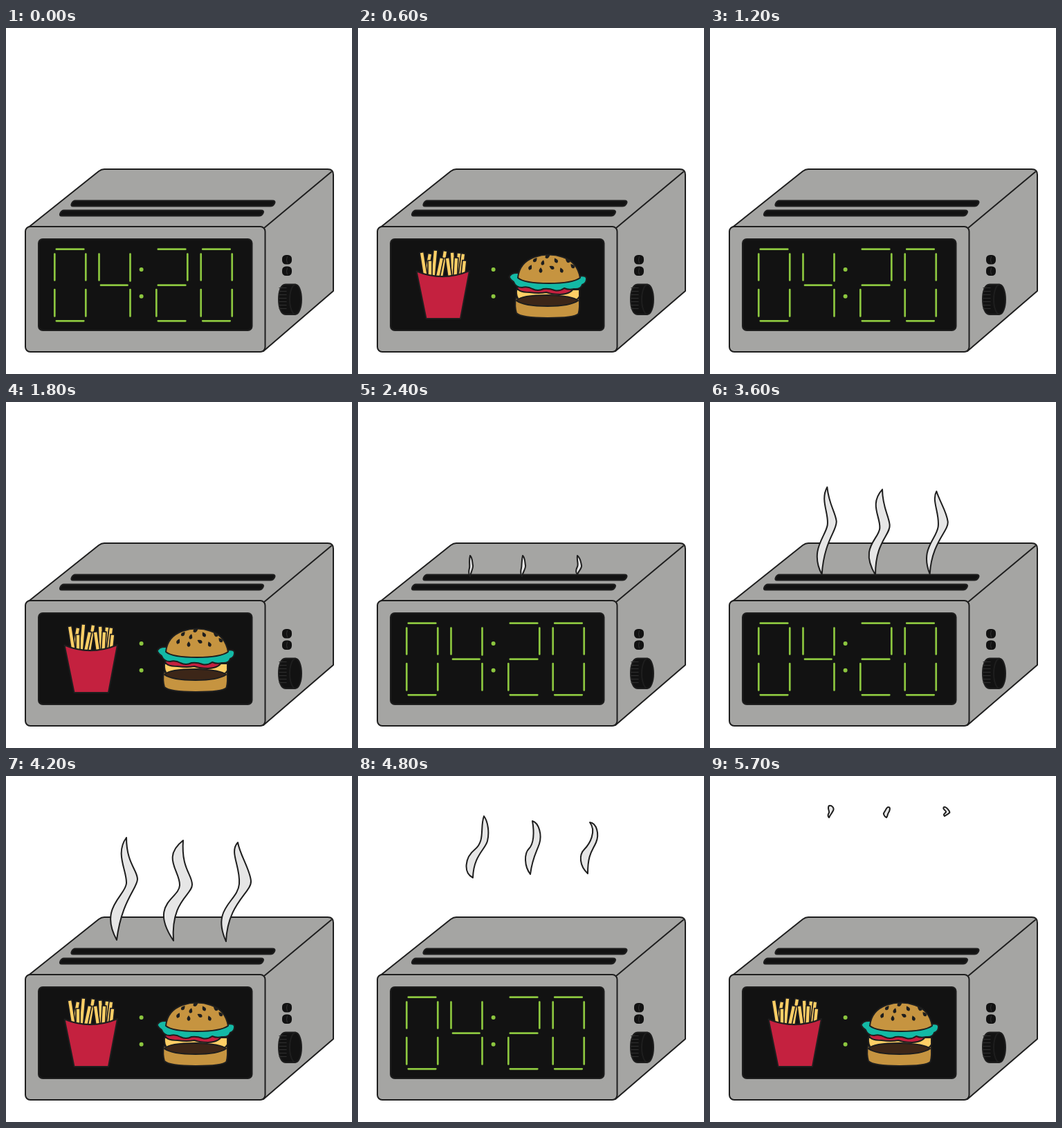
Recreate the animation shown at these times as an HTML page without scripts. Size 500x500 px, loop 6000 ms.

```html
<!DOCTYPE html>
<html lang="en">
<head>
<meta charset="utf-8">
<title>Snack alarm</title>
<style>
  html, body { margin: 0; width: 100%; height: 100%; overflow: hidden; background: #fff; }
  svg { display: block; width: 100%; height: 100%; }

  .ink { stroke: #1e1e1e; stroke-width: 2; stroke-linejoin: round; stroke-linecap: round; }
  .body { fill: #a5a5a3; }
  .dark { fill: #121212; }
  .led { fill: none; stroke: #8cc63f; stroke-width: 2.7; stroke-linecap: round; }
  .red { fill: #c4213f; }
  .bun { fill: #c69440; }
  .yellow { fill: #ffcf66; }

  /* display swaps every 600 ms */
  .clock, .food { animation: blink 1.2s step-end infinite; }
  .food { opacity: 0; animation-name: blink-alt; }
  @keyframes blink { 0% { opacity: 1 } 50%, 100% { opacity: 0 } }
  @keyframes blink-alt { 0% { opacity: 0 } 50%, 100% { opacity: 1 } }

  /* steam rises in 300 ms steps */
  .steam { fill: #e6e6e6; animation: appear 6s step-end infinite; }
  .steam path { animation: 6s infinite; }
  .w1 { animation-name: rise1 !important; }
  .w2 { animation-name: rise2 !important; }
  .w3 { animation-name: rise3 !important; }
  @keyframes appear { 0% { opacity: 0 } 40%, 100% { opacity: 1 } }

  @keyframes rise1 {
    0%, 40% { d: path("M162 222 C166 226 165 232 166 236 S163 246 162 252 C159 248 160 244 161 240 S160 230 162 222Z"); animation-timing-function: steps(2) }
    50% { d: path("M162 185 C169 187 167 200 172 212 S164 232 163 252 C158 246 159 228 165 218 S160 198 162 185Z"); animation-timing-function: steps(3) }
    65% { d: path("M173 92 C173 128 188 138 188 152 S165 184 161 248 C136 198 171 178 172 158 S158 114 173 92Z"); animation-timing-function: step-end }
    70% { d: path("M174 89 C174 126 190 136 190 149 S167 180 160 237 C134 190 173 173 174 155 S157 112 174 89Z"); animation-timing-function: steps(2) }
    80% { d: path("M182 58 C188 66 190 82 187 94 S167 115 166 147 C152 140 154 118 169 106 S176 74 182 58Z"); animation-timing-function: steps(3) }
    95%, 100% { d: path("M172 43 C176 42 180 46 178 50 S174 56 172 60 C169 57 171 55 172 53 S169 46 172 43Z") }
  }
  @keyframes rise2 {
    0%, 40% { d: path("M238 222 C242 226 241 232 242 236 S238 246 237 252 C234 248 235 244 236 240 S236 230 238 222Z"); animation-timing-function: steps(2) }
    50% { d: path("M239 185 C244 187 241 203 245 213 S240 234 237 252 C230 246 232 232 236 223 S237 200 239 185Z"); animation-timing-function: steps(3) }
    65% { d: path("M254 97 C252 136 267 144 267 160 S238 186 240 249 C208 192 250 182 250 162 S226 122 254 97Z"); animation-timing-function: step-end }
    70% { d: path("M256 93 C253 134 269 142 269 157 S238 180 242 238 C206 184 250 178 251 158 S224 118 256 93Z"); animation-timing-function: steps(2) }
    80% { d: path("M252 65 C262 68 266 86 262 98 S252 118 249 142 C240 130 240 112 247 105 S255 82 252 65Z"); animation-timing-function: steps(3) }
    95%, 100% { d: path("M258 45 C261 45 260 50 258 53 S257 58 255 60 C251 58 250 54 252 52 S255 44 258 45Z") }
  }
  @keyframes rise3 {
    0%, 40% { d: path("M317 222 C322 226 322 232 323 236 S319 244 317 249 C314 246 315 242 317 238 S316 230 317 222Z"); animation-timing-function: steps(2) }
    50% { d: path("M316 187 C322 192 324 200 327 208 S321 230 317 248 C313 244 315 229 319 221 S317 198 316 187Z"); animation-timing-function: steps(3) }
    65% { d: path("M333 100 C337 120 351 138 352 155 S320 188 318 249 C298 196 333 184 335 160 S321 114 333 100Z"); animation-timing-function: step-end }
    70% { d: path("M335 96 C338 114 353 136 354 152 S320 184 318 239 C296 190 335 182 337 156 S322 110 335 96Z"); animation-timing-function: steps(2) }
    80% { d: path("M335 67 C345 68 349 84 344 96 S332 112 332 141 C320 130 319 114 327 106 S345 80 335 67Z"); animation-timing-function: steps(3) }
    95%, 100% { d: path("M338 45 C341 44 344 48 346 51 S341 56 339 58 C336 55 340 54 341 52 S335 48 338 45Z") }
  }
</style>
</head>
<body>
<svg viewBox="0 0 500 500">
  <defs>
    <path id="zero" d="M2.5 319.7H42 M0 326.5V364.5 M0 378V416.5 M45 326.5V364.5 M45 378V416.5 M2.5 423.3H42"/>
    <path id="four" d="M0 326.5V364.5 M2.5 371.7H41 M45 326.5V365.5 M45 378V416.5"/>
    <path id="two" d="M2.5 319.7H42 M45 326.5V364.5 M2.5 371.7H42 M0 378V416.5 M2.5 423.3H42"/>
    <path id="slot" d="M100 249.5H385Q390 249.5 388 253.5Q386 257.5 382 257.5H97Q93 257.5 95 253.5Q97 249.5 100 249.5Z"/>
    <rect id="fry" x="-3" width="6" height="40"/>
    <path id="seed" d="M0 -4Q5 2 0 4Q-5 2 0 -4Z"/>
    <g id="button">
      <rect x="399" y="328" width="14" height="13.5" rx="5.5"/>
      <path d="M406.500 330Q404.500 335 406.500 340" fill="none" stroke="#333" stroke-width="1"/>
    </g>
  </defs>

  <g class="ink body">
    <path d="M30 290L134 207Q138 204 142 204H465Q473 204 473 212V380L372 467Z"/>
    <path d="M373 289L470 208" fill="none"/>
    <rect x="28" y="287" width="346.500" height="181" rx="7"/>
  </g>
  <g class="ink dark">
    <use href="#slot"/>
    <use href="#slot" x="-16.500" y="14"/>
    <rect x="47" y="305" width="308.500" height="132" rx="6"/>
  </g>

  <g class="dark">
    <use href="#button"/>
    <use href="#button" y="16.500"/>
    <path class="ink" d="M418 370.500H404C397 370.500 394 381 394 392S397 414 404 414H418Z"/>
    <path d="M400 375V410" fill="none" stroke="#303030" stroke-width="11" stroke-dasharray="1 4"/>
    <ellipse class="ink" cx="418.500" cy="392.300" rx="8.500" ry="21.500"/>
  </g>

  <g fill="#8cc63f">
    <circle cx="195.600" cy="349" r="3"/>
    <circle cx="195.600" cy="387.700" r="3"/>
  </g>

  <g class="clock led">
    <use href="#zero" x="70.300"/>
    <use href="#four" x="134.500"/>
    <use href="#two" x="217.300"/>
    <use href="#zero" x="281.700"/>
  </g>

  <g class="food ink">
    <g class="yellow" stroke-width="1.700">
      <use href="#fry" transform="translate(126 322) rotate(9)"/>
      <use href="#fry" transform="translate(104 326) rotate(10)"/>
      <use href="#fry" transform="translate(146 325) rotate(4)"/>
      <use href="#fry" transform="translate(152 326) rotate(7)"/>
      <use href="#fry" transform="translate(92 324) rotate(-9)"/>
      <use href="#fry" transform="translate(112 321) rotate(5)"/>
      <use href="#fry" transform="translate(136 324) rotate(-3)"/>
      <use href="#fry" transform="translate(121 332) rotate(12)"/>
      <use href="#fry" transform="translate(129 332) rotate(-8)"/>
      <use href="#fry" transform="translate(104 336)"/>
      <use href="#fry" transform="translate(142 332) rotate(3)"/>
      <use href="#fry" transform="translate(154 336) rotate(6)"/>
    </g>
    <path class="red" d="M84.500 351.500Q122 367 161 351L148 420H98.500Z"/>

    <path class="bun" d="M228 390Q274 402 319.500 390Q321 404 318.500 413Q313 419 274 419Q236 419 229 412Q226 402 228 390Z"/>
    <path class="yellow" d="M229 378H320V388Q316 394 312 394H234Q228 390 229 378Z"/>
    <path d="M229 394Q236 386 274 386Q310 387 318 394Q306 402 274 402Q240 402 229 394Z" fill="#3c2618"/>
    <path class="red" d="M230 374H312Q310 384 292 385Q280 385 272 382Q262 384 248 382Q230 382 230 374Z"/>
    <path d="M232 354Q221 353 218.500 360Q221 365 225 367Q228 375 237 375Q245 373 252 377Q260 381 268 377Q276 376 284 379Q291 381 298 376Q305 379 312 377Q322 378 324 371Q331 368 330 361Q328 357 319 359Z" fill="#13b9a5"/>
    <path class="bun" d="M231 361Q233 339 255 331Q276 324 296 331Q317 338 321 361Q310 369 276 369Q240 369 231 361Z"/>
    <g fill="#1e1e1e" stroke="none">
      <use href="#seed" transform="translate(249 346) rotate(25)"/>
      <use href="#seed" transform="translate(264 350)"/>
      <use href="#seed" transform="translate(267 339) rotate(15)"/>
      <use href="#seed" transform="translate(280 346) rotate(-60)"/>
      <use href="#seed" transform="translate(286 336) rotate(-30)"/>
      <use href="#seed" transform="translate(294 350) rotate(-20)"/>
      <use href="#seed" transform="translate(274 330) rotate(60)"/>
      <use href="#seed" transform="translate(256 335) rotate(40)"/>
      <use href="#seed" transform="translate(303 336) rotate(-50)"/>
      <use href="#seed" transform="translate(310 344) rotate(-40)"/>
    </g>
  </g>

  <g class="steam ink">
    <path class="w1"/>
    <path class="w2"/>
    <path class="w3"/>
  </g>
</svg>
</body>
</html>
```
